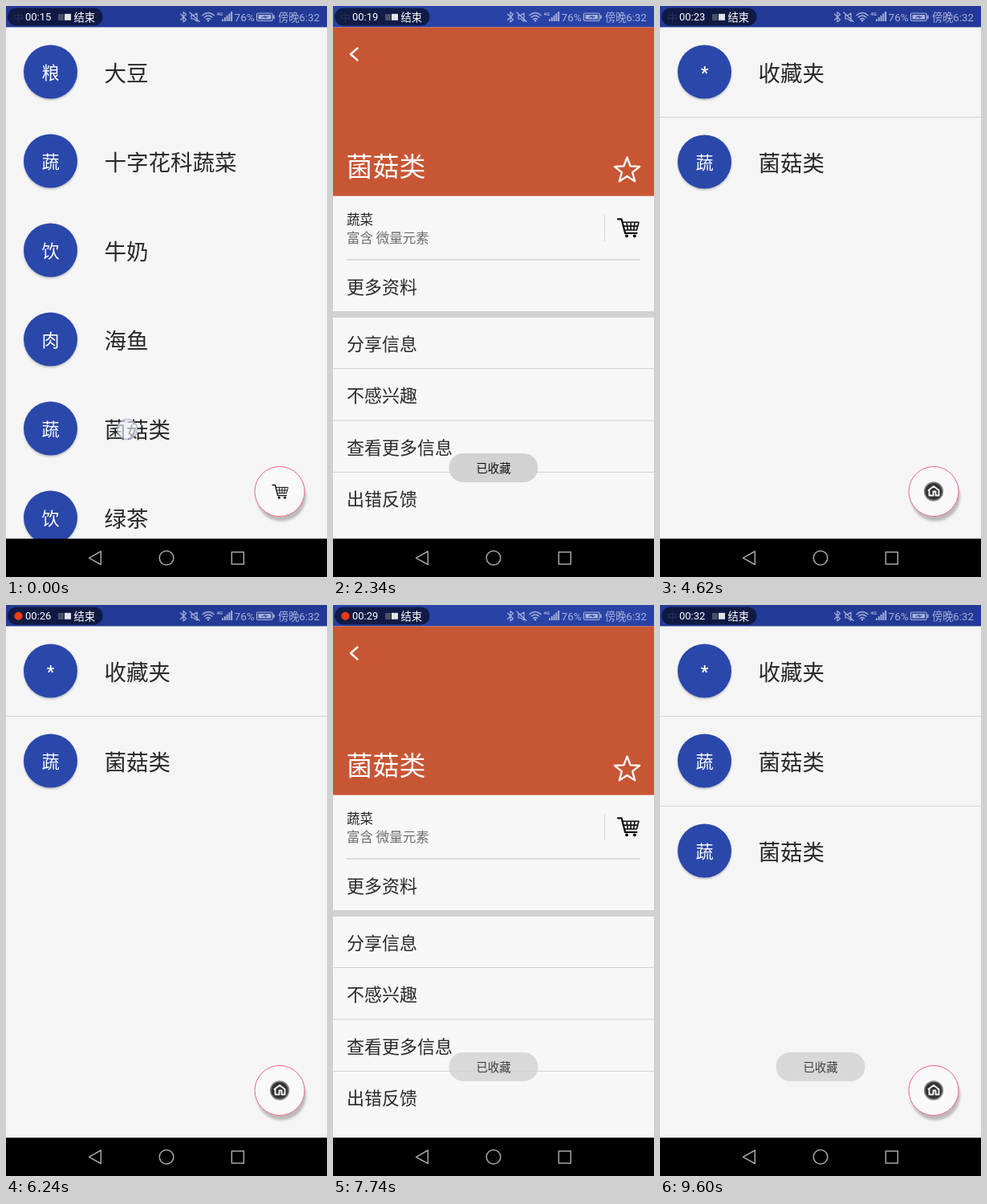
Recreate the animation shown at these times as an HTML page. Size 400 by 711 pixels, loop 9.66 s.

```html
<!DOCTYPE html>
<html lang="zh-CN">
<head>
<meta charset="utf-8">
<style>
html, body { margin: 0; width: 100%; height: 100%; overflow: hidden; background: #000; }
svg { display: block; width: 100%; height: 100%; font-family: "Noto Sans CJK SC", "Noto Sans CJK", sans-serif; }
.line { fill: none; stroke-linecap: round; stroke-linejoin: round; }
.latin { font-family: Roboto, "Noto Sans CJK SC", "Noto Sans CJK", sans-serif; }
.thin { font-family: "Noto Sans CJK SC Light", "Noto Sans CJK SC DemiLight", "Noto Sans CJK SC", sans-serif; font-weight: 300; }
</style>
</head>
<body>
<svg id="stage" viewBox="0 0 400 711" preserveAspectRatio="none"></svg>
<script>
const LOOP = 9660, STEP = 60, SLIDE = 360;
const LIST_SWAP = 3840, SECOND_FAVORITE = 7560;
const TOP = 26.4, BOTTOM = 663.3;
const visits = [[240, 2580], [6780, 8818]];
const toasts = [[1140, 3130], [7620, 9570]];
// start, end, x, y
const touches = [
  [0, 110, 151, 527], [800, 1010, 368, 277], [2460, 2640, 36, 67],
  [3700, 3880, 341, 604], [6580, 6780, 150, 196],
  [7400, 7600, 368, 277], [8700, 8910, 36, 67]
];
// time in ms, recorder clock in seconds
const clock = [[0, 15.3], [900, 16.45], [3120, 20.7], [4620, 23.3], [6000, 26],
  [6900, 28.55], [8880, 31.7], [9660, 32.49]];

const clamp = v => Math.min(1, Math.max(0, v));

// Text placed by the vertical centre of its CJK glyphs
const label = (x, cy, size, text, fill = '#292929', extra = '') =>
  `<text x="${x}" y="${cy + size * .38}" font-size="${size}" fill="${fill}" ${extra}>${text}</text>`;
const rect = (x, y, w, h, fill, extra = '') =>
  `<rect x="${x}" y="${y}" width="${w}" height="${h}" fill="${fill}" ${extra}/>`;
const stroke = (d, color, width, extra = '') =>
  `<path class="line" d="${d}" stroke="${color}" stroke-width="${width}" ${extra}/>`;

const cart = (x, y, scale, weight = 1) => `<g transform="translate(${x} ${y}) scale(${scale})">
  ${stroke('M0 1H3.5L7 14.5H18', '#111', 1.4 * weight)}
  ${stroke('M4.3 4H20L18 11.5H6.3M5 7.8H19M8.5 4L9.5 11.5M12.4 4V11.5M16.2 4L15.2 11.5', '#111', weight)}
  <circle cx="8.5" cy="17.2" r="1.5"/><circle cx="16" cy="17.2" r="1.5"/></g>`;

const home = `<circle cx="341" cy="604.5" r="11.4" fill="#333" stroke="#8a8a8a" stroke-width="1.6"/>
  ${stroke('M334.5 603L341 598L347.5 603V609.5H343.5V604.5H340.5V609.5H335.5V603', '#f4f4f4', 1.9)}`;

const row = (cy, tag, name) => `
  <circle cx="55.5" cy="${cy}" r="33.5" fill="#2a47aa" filter="url(#soft)"/>
  ${label(55.5, cy + .8, 22, tag, '#fff', 'class="latin" text-anchor="middle" font-weight="500"')}
  ${label(122.5, cy + 1.2, 27.5, name)}`;

const fab = icon => `<circle cx="341" cy="604.5" r="31" fill="#f9f9f9" filter="url(#lift)"/>
  <circle cx="341" cy="604.5" r="31" fill="#f9f9f9" stroke="#ea6583"/>${icon}`;

const foods = [['粮', '大豆'], ['蔬', '十字花科蔬菜'], ['饮', '牛奶'],
  ['肉', '海鱼'], ['蔬', '菌菇类'], ['饮', '绿茶']];

const star = Array.from({ length: 10 }, (_, i) => {
  const r = i % 2 ? 7 : 16.5, a = i * Math.PI / 5;
  return `${366.5 + r * Math.sin(a)} ${205 - r * Math.cos(a)}`;
}).join('L');

const options = ['分享信息', '不感兴趣', '查看更多信息', '出错反馈'];

const detailPage = `
  ${rect(0, 0, 400, 27, '#2942a6')}
  ${rect(0, TOP, 400, BOTTOM - TOP, '#f7f7f7')}
  ${rect(0, TOP, 400, 236.6 - TOP, '#c75634', 'id="header"')}
  ${stroke('M30.5 52.5L22 60L30.5 67.5', '#fff', 2.4)}
  ${label(16.5, 199.3, 33, '菌菇类', '#fff', 'class="thin"')}
  ${stroke(`M${star}Z`, '#fff', 2.3)}
  ${label(17, 266, 16.5, '蔬菜', '#222')}
  ${label(17, 288.5, 16.5, '富含 微量元素', '#6e6e6e')}
  ${rect(338, 260, 1, 33, '#d4d4d4')}
  ${cart(355, 264, 1.3, 1.25)}
  ${rect(17, 315.5, 366, 1, '#c4c4c4')}
  ${label(17, 349.5, 22, '更多资料')}
  ${rect(0, 380, 400, 8, '#d2d2d2')}
  ${options.map((text, i) => label(17, 420.5 + 64.5 * i, 22, text)).join('')}
  ${[451, 515.5, 580].map(y => rect(0, y, 400, 1, '#d2d2d2')).join('')}
  ${rect(0, TOP, 400, BOTTOM - TOP, '#000', 'id="veil"')}`;

const statusIcons = `
  ${stroke('M217.5 10L224.5 17L221 20V7.5L224.5 10.5L217.5 17.5', '#a9b3da', 1.1)}
  ${stroke('M229 8L241 19.5M231 11.5V16H234L238 19V9L234 11.5Z', '#a9b3da', 1.2)}
  ${stroke('M245 11.5Q252 5.5 259 11.5M247.3 14Q252 10 256.7 14M249.6 16.5Q252 14.5 254.4 16.5', '#a9b3da', 1.5)}
  <circle cx="252" cy="18.3" r="1.2" fill="#a9b3da"/>
  <text class="latin" x="262.5" y="12" font-size="6" font-weight="700" fill="#a9b3da">4G</text>
  ${[0, 1, 2, 3, 4].map(i => rect(269 + 2.8 * i, 16.5 - 2.4 * i, 1.9, 2.5 + 2.4 * i, '#a9b3da')).join('')}
  <text class="latin" x="284.5" y="18.6" font-size="13.6" fill="#a9b3da">76%</text>
  ${rect(312.5, 9, 19.5, 9.5, 'none', 'rx="1.5" stroke="#a9b3da" stroke-width="1.2"')}
  ${rect(314.5, 11, 15.5, 5.5, '#a9b3da')}${rect(333, 11.5, 1.6, 4.5, '#a9b3da')}
  ${stroke('M319 14.3L323 12.5V14.8L326 13.2', '#2a44a0', 1.2)}
  <text class="latin" x="339" y="18.6" font-size="13.2" fill="#a9b3da">傍晚6:32</text>`;

const recorder = `
  ${label(9, 14, 13, '中', '#a9b3da')}
  ${rect(2, 2.5, 118.5, 22, '#0b1230', 'rx="11" opacity=".8"')}
  <circle id="dot" cx="15.5" cy="13.7" r="5" fill="#f23a16"/>
  <text id="time" class="latin" x="24" y="18.4" font-size="13" fill="#fff"></text>
  ${rect(65, 10, 7, 8, '#4b5168')}${rect(73, 9.8, 8, 8, '#e4e4e8')}
  ${label(84.5, 14, 13.3, '结束', '#fff')}`;

const navigation = rect(0, BOTTOM, 400, 711 - BOTTOM, '#000') +
  stroke('M103.5 687.3L118.3 679V695.5Z', '#a6a6a6', 1.5) +
  '<circle cx="200" cy="687.3" r="8.8" fill="none" stroke="#a6a6a6" stroke-width="1.5"/>' +
  rect(281.3, 680, 15, 15, 'none', 'stroke="#a6a6a6" stroke-width="1.5"');

document.getElementById('stage').innerHTML = `
  <defs>
    <filter id="soft"><feDropShadow dx="0" dy="1.5" stdDeviation="1.2" flood-opacity=".25"/></filter>
    <filter id="lift" x="-30%" y="-30%" width="160%" height="160%">
      <feDropShadow dx="2" dy="6" stdDeviation="1.8" flood-opacity=".24"/></filter>
  </defs>
  ${rect(0, 0, 400, 711, '#f5f5f5')}
  ${rect(0, 0, 400, TOP, '#223a96')}
  <g id="lists">
    <g id="foods">${foods.map(([tag, name], i) => row(82 + 111 * i, tag, name)).join('')}
      ${fab(cart(332, 595.5, .97))}</g>
    <g id="favorites">
      ${rect(0, 139, 400, 111, '#000', 'id="pressed" opacity=".075"')}
      ${rect(0, 138, 400, 1, '#d3d3d3')}
      ${row(82, '*', '收藏夹')}${row(194, '蔬', '菌菇类')}
      <g id="second">${rect(0, 250, 400, 1, '#d3d3d3')}${row(306, '蔬', '菌菇类')}</g>
      ${fab(home)}</g>
  </g>
  ${rect(0, 0, 400, BOTTOM, '#000', 'id="dim"')}
  <g id="detail">${detailPage}</g>
  <g id="toast">${rect(144.5, 557, 111, 36, '#d2d2d2', 'rx="18"')}
    ${label(200, 575.5, 14.4, '已收藏', '#111', 'text-anchor="middle"')}</g>
  ${statusIcons}${recorder}${navigation}
  <circle id="touch" r="12.5" fill="#eef0f4" fill-opacity=".65" stroke="#8d9cc4" stroke-opacity=".6" stroke-width="1.6"/>`;

const el = {};
document.querySelectorAll('#stage [id]').forEach(node => el[node.id] = node);
const set = (node, name, value) => node.setAttribute(name, value);
const show = (node, on) => set(node, 'visibility', on ? 'inherit' : 'hidden');
const move = (node, x) => set(node, 'transform', `translate(${x} 0)`);

function slideState(t) {
  for (const [open, close] of visits) {
    if (t < open || t >= close + SLIDE) continue;
    if (t >= close) {
      const u = (t - close) / SLIDE, p = u * u * (3 - 2 * u);
      return { x: 400 * p, depth: 1 - p, shade: 0 };
    }
    const p = 1 - (1 - clamp((t - open) / SLIDE)) ** 2.574;
    return { x: 400 * (1 - p), depth: p ** 4, shade: 1 - clamp((t - open - SLIDE * .4) / (SLIDE * .6)) };
  }
  return { x: 400, depth: 0, shade: 0 };
}

function clockAt(t) {
  const i = clock.findIndex(([time]) => time > t);
  const [t0, s0] = clock[i - 1], [t1, s1] = clock[i];
  return s0 + (s1 - s0) * (t - t0) / (t1 - t0);
}

function render(t) {
  const { x, depth, shade } = slideState(t);
  move(el.detail, x);
  show(el.detail, x < 400);
  move(el.lists, -200 * depth);
  set(el.dim, 'opacity', .45 * depth ** .75);
  set(el.veil, 'opacity', .02 * shade);
  set(el.header, 'fill', `rgb(${199 - 11 * shade} ${86 - 11 * shade} ${52 - 10 * shade})`);

  show(el.foods, t < LIST_SWAP);
  show(el.favorites, t >= LIST_SWAP);
  show(el.second, t >= SECOND_FAVORITE);
  show(el.pressed, t > 6640 && t < 7140);

  const toastAlpha = Math.max(...toasts.map(([start, end]) =>
    Math.min(clamp((t - start) / 150), 1 - clamp((t - end) / 150))));
  set(el.toast, 'opacity', toastAlpha);

  const touch = touches.find(([start, end]) => t >= start && t < end);
  show(el.touch, touch);
  if (touch) {
    set(el.touch, 'cx', touch[2]);
    set(el.touch, 'cy', touch[3]);
    set(el.touch, 'opacity', clamp((touch[1] - t) / 60));
  }

  const seconds = clockAt(t);
  el.time.textContent = '00:' + Math.floor(seconds);
  show(el.dot, seconds % 1 >= .5);
}

const start = performance.now();
function tick() {
  const t = (performance.now() - start) % LOOP;
  render(Math.floor(t / STEP) * STEP);
  requestAnimationFrame(tick);
}
tick();
</script>
</body>
</html>
```
